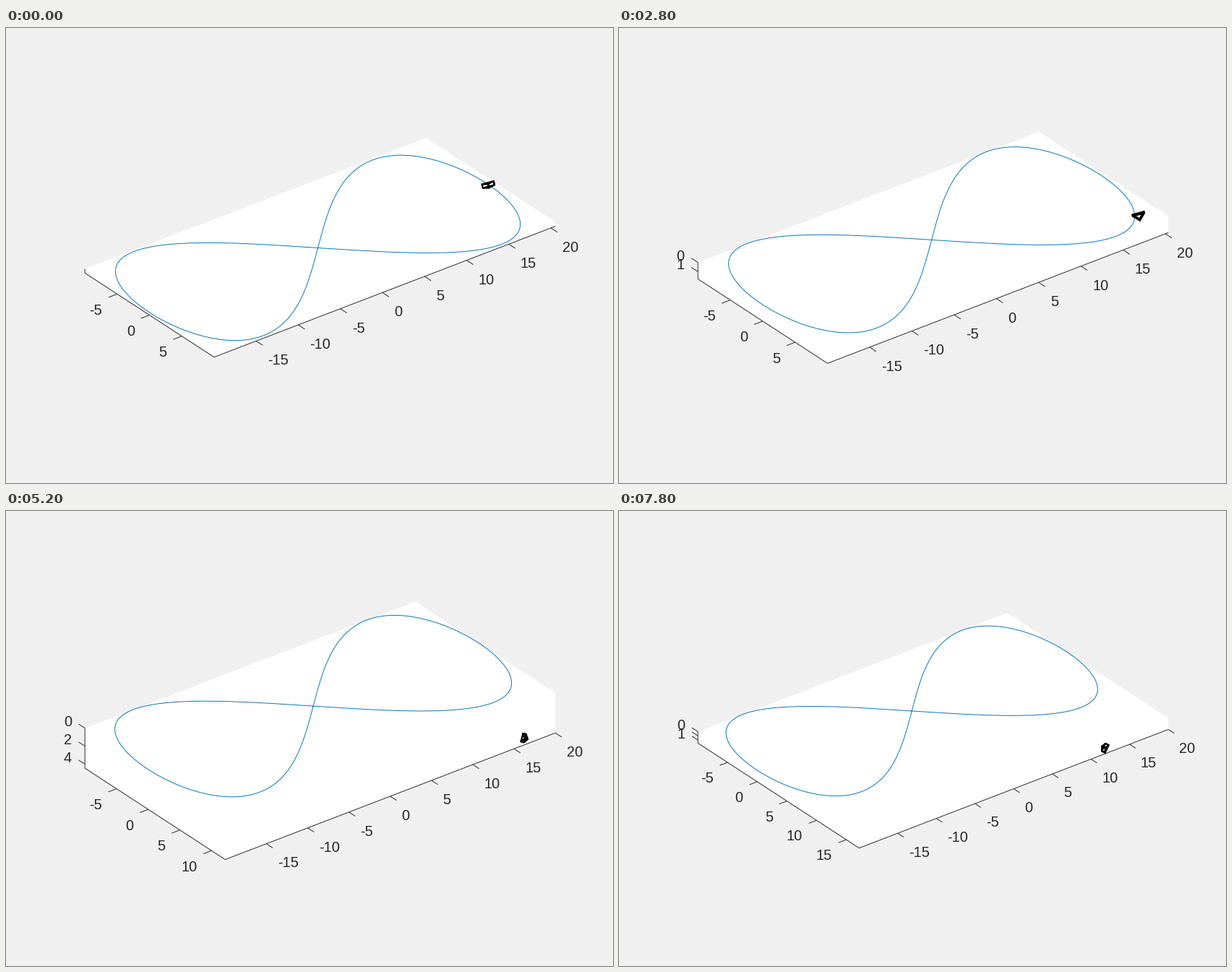
These frames come from a looping animation (840x630 px, 8000 ms). A matplotlib script:

```python
import numpy as np
import matplotlib.pyplot as plt
from matplotlib.animation import FuncAnimation

W, H, DPI = 840, 630, 100
FRAMES, STEP = 40, 200
PX = 72 / DPI
INK, BLUE, PAPER = "#262626", "#0072BD", "#F0F0F0"

# Axes area in pixels, and the view: azimuth 37.5, elevation 30 degrees
LEFT, RIGHT, MID_Y = 0.13 * W, 0.905 * W, 0.4825 * H
CA, SA = np.cos(np.radians(37.5)), np.sin(np.radians(37.5))
SE, CE = 0.5, np.cos(np.radians(30))

REACH = np.array([0.53, 0.68, 0.23])  # half size of the vehicle on each axis
FLOOR_LO, FLOOR_HI = np.array([-19.99, -9.99, 0]), np.array([20, 9.99, 0])
TRIANGLE = np.array([[-8.2, -3], [8.4, -3], [0, 6]])
THICKNESS = 5.5
EDGES = [0, 1, 2, 0, 3, 4, 1, 4, 5, 2, 5, 3]


def position(k):
    """The vehicle crosses at a steady pace, turns inwards, dives and rises."""
    x = 20 - 8 / (1 + np.exp(-0.28 * (k - 27.4)))
    y = 0.3 + 0.415 * k + 0.4 * np.exp(-((k - 27) / 5) ** 2)
    d = k - 27.2
    z = 4.25 * (np.exp(-(d / 13.2) ** 2) if d < 0 else 1 / (1 + (d / 7.1) ** 2))
    return np.array([x, y, z])


def wedge(k):
    """Corners of a tilting, spinning triangular plate, in pixels about its centre."""
    turn = max(0, (k - 17) / 22)
    spin = np.radians(15 + 230 * turn ** 1.5)
    tilt = np.radians(48 + 30 * np.cos(2 * np.pi * k / 34))
    along = np.array([np.cos(spin), -np.sin(spin)])
    across = np.array([np.sin(spin), np.cos(spin)])
    size = 1 - 0.3 * min(1, 2.4 * turn)
    face = size * (np.outer(TRIANGLE[:, 0], along)
                   + np.outer(TRIANGLE[:, 1] * np.cos(tilt), across))
    half = THICKNESS / 2 * np.sin(tilt) * across
    return np.vstack([face - half, face + half])


def make_view(lo, hi):
    """Fit the box to the axes width; y and z point towards the viewer and down."""
    size, mid = hi - lo, (lo + hi) / 2
    scale = (RIGHT - LEFT) / (CA * size[0] + SA * size[1])

    def project(x, y, z):
        x, y, z = x - mid[0], y - mid[1], z - mid[2]
        sx = (LEFT + RIGHT) / 2 + scale * (CA * x + SA * y)
        sy = MID_Y + scale * (SE * (CA * y - SA * x) + CE * z)
        return sx, sy

    return project


def depth_ticks(depth):
    if depth < 1:
        return []
    step = 0.5 if depth < 1.5 else 1 if depth < 3 else 2
    return np.arange(0, depth, step)


fig = plt.figure(figsize=(W / DPI, H / DPI), dpi=DPI, facecolor=PAPER)
ax = fig.add_axes([0, 0, 1, 1])
plt.rcParams["font.family"] = "Liberation Sans"


def line(points, color=INK, width=0.95):
    xs, ys = zip(*points)
    ax.plot(xs, ys, color=color, lw=width * PX,
            solid_joinstyle="round", solid_capstyle="butt")


def tick(start, end, value, shift, align):
    line([start, end])
    if value == int(value):
        ax.text(end[0] + shift[0], end[1] + shift[1] + 7, f"{value:g}",
                size=20 * PX, color=INK, ha=align, va="baseline")


def draw(k):
    ax.clear()
    ax.set_axis_off()
    ax.set_xlim(0, W)
    ax.set_ylim(H, 0)

    pos = position(k)
    lo, hi = np.minimum(FLOOR_LO, pos - REACH), np.maximum(FLOOR_HI, pos + REACH)
    (x0, y0, z0), (x1, y1, z1) = lo, hi
    project = make_view(lo, hi)

    # Walls and floor, then the three ruled edges
    left, front, right = project(x0, y0, z1), project(x0, y1, z1), project(x1, y1, z1)
    left_top = project(x0, y0, z0)
    ax.fill(*zip(left_top, project(x1, y0, z0), project(x1, y1, z0),
                 right, front, left), color="white", lw=0)
    line([left_top, left, front, right])

    length = 0.025 * (x1 - x0)
    for v in range(-15, 21, 5):
        tick(project(v, y1, z1), project(v, y1 + length, z1), v, (7, 20), "left")
    for v in range(-5, int(y1) + 1, 5):
        tick(project(x0, v, z1), project(x0 - length, v, z1), v, (-8.7, 17), "right")
    for v in depth_ticks(z1):
        tick(project(x0, y0, v), project(x0, y0 - length, v), v, (-9.5, -4), "right")

    t = np.linspace(0, 2 * np.pi, 400)
    line(zip(*project(20 * np.cos(t), 10 * np.sin(2 * t), 0)), BLUE)
    line((wedge(k) + project(*pos))[EDGES], "black", 2.3)
    return []


anim = FuncAnimation(fig, draw, frames=FRAMES, interval=STEP, init_func=lambda: [],
                     repeat=True, repeat_delay=0, blit=False)
plt.show()
```
